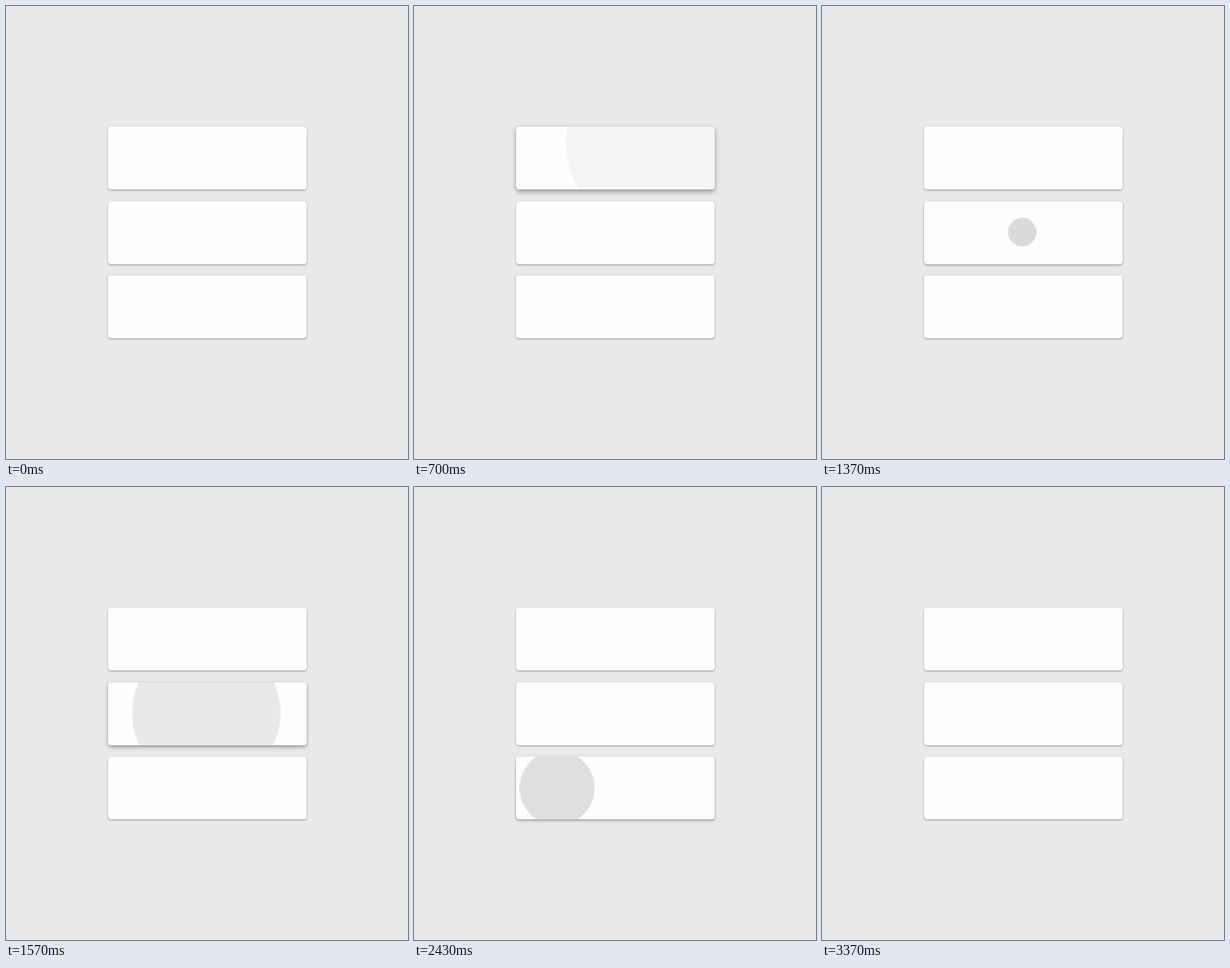
Recreate the animation shown at these times as an HTML page. Size 500x563 px, loop 3.71 s.

```html
<!DOCTYPE html>
<html lang="en">
<head>
<meta charset="utf-8">
<title>Card ripples</title>
<style>
  html, body {
    margin: 0;
    width: 100%;
    height: 100%;
    overflow: hidden;
    background: #e9e9e9;
  }

  .card {
    --low: 0 1px 3px rgba(0, 0, 0, .12), 0 1px 2px rgba(0, 0, 0, .24);
    --high: 0 3px 10px rgba(0, 0, 0, .18), 0 3px 6px rgba(0, 0, 0, .25);
    position: absolute;
    left: 127px;
    top: var(--top);
    width: 247px;
    height: 78px;
    border-radius: 4px;
    overflow: hidden;
    background: #fdfdfd;
    box-shadow: var(--low);
    animation: lift 3710ms linear var(--start) infinite;
  }

  .card::after {
    content: "";
    position: absolute;
    left: calc(var(--x) - 128px);
    top: calc(var(--y) - 128px);
    width: 256px;
    height: 256px;
    border-radius: 50%;
    background: #000;
    opacity: 0;
    transform: scale(0);
    animation:
      grow 3710ms linear var(--start) infinite,
      fade 3710ms linear var(--start) infinite;
  }

  .first  { --top: 150px; --start: 320ms;  --x: 183px; --y: 19px; }
  .second { --top: 243px; --start: 1335ms; --x: 122px; --y: 38px; }
  .third  { --top: 335px; --start: 2330ms; --x: 51px;  --y: 39px; }

  /* up for 520 ms, down for 520 ms */
  @keyframes lift {
    0%, 28.032%, 100% { box-shadow: var(--low); }
    14.016% { box-shadow: var(--high); }
  }

  /* ripple lasts 500 ms */
  @keyframes grow {
    0% { transform: scale(0); animation-timing-function: cubic-bezier(.333, .667, .667, 1); }
    13.477%, 100% { transform: scale(1); }
  }

  @keyframes fade {
    0% { opacity: .15; }
    13.477%, 100% { opacity: 0; }
  }
</style>
</head>
<body>
  <div class="card first"></div>
  <div class="card second"></div>
  <div class="card third"></div>
</body>
</html>
```
